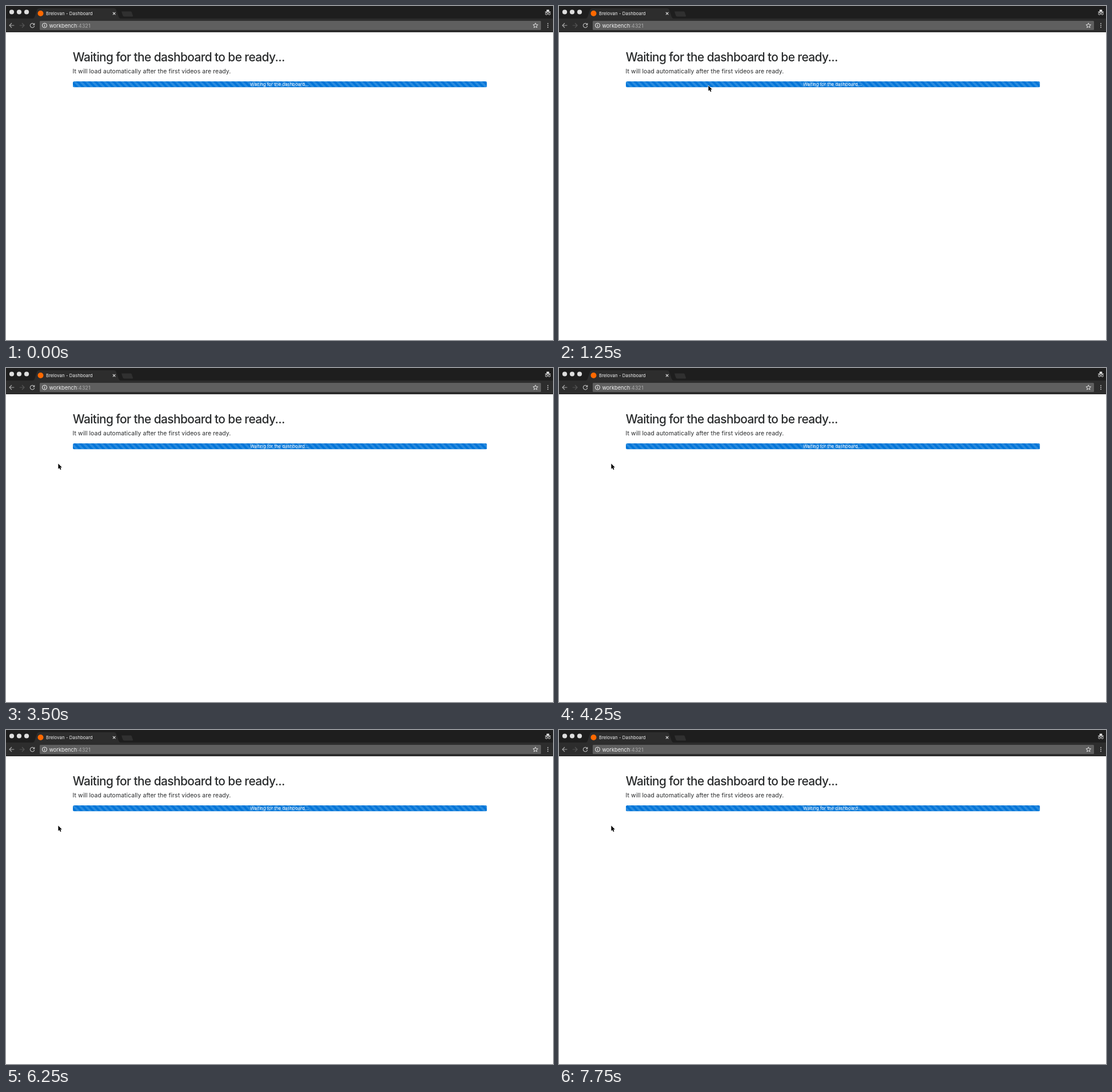
An HTML page with a canvas that plays this animation: 957 px wide and 585 px high, repeating every 8000 ms.

```html
<!DOCTYPE html>
<html lang="en">
<head>
<meta charset="utf-8">
<title>Dashboard</title>
<style>
  html, body { margin: 0; width: 100%; height: 100%; overflow: hidden; background: #fff; }
  canvas { display: block; }
</style>
</head>
<body>
<canvas id="stage" width="957" height="585"></canvas>
<script>
const ctx = document.getElementById('stage').getContext('2d');
const LOOP = 8000, STEP = 250;
const BAR = { x: 117, y: 132, w: 724.5, h: 10.4 };
const PERIOD = 10.45;

// Pointer stops: time, x, y of the tip
const POINTER = [
  [1000, 330, 101], [1250, 261, 139], [1500, 180, 155], [1750, 118, 165], [2000, 91, 167]
];

function text(str, x, y, size, color, weight = 400, spacing = 0) {
  ctx.font = `${weight} ${size}px Inter, sans-serif`;
  ctx.letterSpacing = spacing + 'px';
  ctx.fillStyle = color;
  ctx.fillText(str, x, y);
  return x + ctx.measureText(str).width;
}

function rect(x, y, w, h, color, r = 0) {
  ctx.fillStyle = color;
  ctx.beginPath();
  ctx.roundRect(x, y, w, h, r);
  ctx.fill();
}

function dot(x, y, r, color) {
  ctx.fillStyle = color;
  ctx.beginPath();
  ctx.arc(x, y, r, 0, Math.PI * 2);
  ctx.fill();
}

function shape(d, fill, stroke, width = 1, x = 0, y = 0) {
  const path = new Path2D(d);
  ctx.save();
  ctx.translate(x, y);
  if (stroke) {
    ctx.strokeStyle = stroke;
    ctx.lineWidth = width;
    ctx.stroke(path);
  }
  if (fill) {
    ctx.fillStyle = fill;
    ctx.fill(path);
  }
  ctx.restore();
}

function drawTabs() {
  rect(0, 0, 957, 23, '#1e1e1e');
  for (const x of [10, 23, 36]) dot(x, 10.5, 4.1, '#dedede');
  shape('M46 22.5 Q49 22 50 19 L54.500 6 Q55.500 4 58 4 H189 Q191.500 4 192.500 6 L197 19 Q198 22 201 22.500Z', '#2d2d2d');
  shape('M202 9.500 H218 Q219.500 9.500 220 11 L222 17 Q222.500 18.500 221 18.500 H207 Q205 18.500 204.300 16.500Z', '#303030');
  dot(60.5, 13, 5, '#ff6900');
  text('Brelovan - Dashboard', 70, 15.9, 7.84, '#f2f2f2', 400, 0.05);
  shape('M187 11 l4.400 4.400 M191.400 11 l-4.400 4.400', null, '#d8d8d8', 1.1);
  // Private-window badge
  shape('M945.300 9.600 L946.100 6.300 Q948 7 949.900 6.300 L950.700 9.600Z M943 10.100 H953 V11 H943Z', '#f0f0f0');
  shape('M947.200 13.600 a1.750 1.750 0 1 1 -3.500 0 a1.750 1.750 0 1 1 3.500 0 Q948 13 948.800 13.600 a1.750 1.750 0 1 1 3.500 0 a1.750 1.750 0 1 1 -3.500 0', null, '#f0f0f0', 0.9);
}

function drawToolbar() {
  rect(0, 22, 957, 24, '#2d2d2d');
  rect(0, 45, 957, 1, '#242424');
  const arrow = 'M4.300 0 H-4 M0 -4 L-4 0 L0 4';
  shape(arrow, null, '#a8a8a8', 1.2, 10, 34);
  shape('M-4.300 0 H4 M0 -4 L4 0 L0 4', null, '#555', 1.2, 28, 34);
  shape('M3.100 -2 A3.700 3.700 0 1 0 3.700 0.800', null, '#b8b8b8', 1.2, 46, 34);
  shape('M4.300 -4.400 V-0.500 H0.400Z', '#b8b8b8', null, 1, 46, 34);

  rect(59, 26, 877, 16, '#5f5f5f', 1.5);
  shape('M4 0 A4 4 0 1 1 -4 0 A4 4 0 1 1 4 0', null, '#f0f0f0', 1, 67.5, 34);
  rect(67, 33.3, 1, 3, '#f0f0f0');
  rect(67, 31.4, 1, 1.1, '#f0f0f0');
  const end = text('workbench', 75.5, 37.5, 9.2, '#f2f2f2');
  text(':4321', end, 37.5, 9.2, '#a9a9a9');

  let star = '';
  for (let i = 0; i < 10; i++) {
    const r = i % 2 ? 2 : 4.5, a = i * Math.PI / 5;
    star += (i ? 'L' : 'M') + r * Math.sin(a) + ' ' + -r * Math.cos(a);
  }
  shape(star + 'Z', null, '#f0f0f0', 0.9, 926.3, 34.3);
  for (const y of [30.7, 34, 37.3]) dot(948, y, 0.95, '#c4c4c4');
}

function drawBar(time) {
  const shift = PERIOD * (1 - time / 1000 % 1);
  ctx.save();
  ctx.beginPath();
  ctx.roundRect(BAR.x, BAR.y, BAR.w, BAR.h, 2.5);
  ctx.clip();
  rect(BAR.x, BAR.y, BAR.w, BAR.h, '#0275d8');
  ctx.fillStyle = 'rgba(255,255,255,.15)';
  ctx.beginPath();
  for (let x = BAR.x + shift - 3 * PERIOD; x < BAR.x + BAR.w; x += PERIOD) {
    ctx.moveTo(x, BAR.y);
    ctx.lineTo(x + PERIOD / 2, BAR.y);
    ctx.lineTo(x + PERIOD / 2 + BAR.h, BAR.y + BAR.h);
    ctx.lineTo(x + BAR.h, BAR.y + BAR.h);
  }
  ctx.fill();
  ctx.restore();
  text('Waiting for the dashboard...', 427, 139.9, 7.84, '#fff');
}

function drawPointer(time) {
  const stop = POINTER.findLast(([at]) => at <= time);
  if (!stop) return;
  ctx.lineJoin = 'round';
  shape('M0 0 V9.200 L2.100 7.300 L3.500 10.600 L5.100 9.900 L3.700 6.700 H6.500Z', '#000', '#fff', 1.2, stop[1] + 0.4, stop[2] + 0.6);
  ctx.lineJoin = 'miter';
}

function draw(now) {
  const time = Math.floor(now % LOOP / STEP) * STEP;
  rect(0, 0, 957, 585, '#fff');
  drawTabs();
  drawToolbar();
  text('Waiting for the dashboard to be ready...', 116.7, 96.6, 20.9, '#292b2c', 500, -0.6);
  text('It will load automatically after the first videos are ready.', 116.5, 117.6, 10.45, '#292b2c', 400, 0.08);
  drawBar(time);
  drawPointer(time);
}

const start = performance.now();
function tick() {
  draw(performance.now() - start);
  requestAnimationFrame(tick);
}
tick();
</script>
</body>
</html>
```
